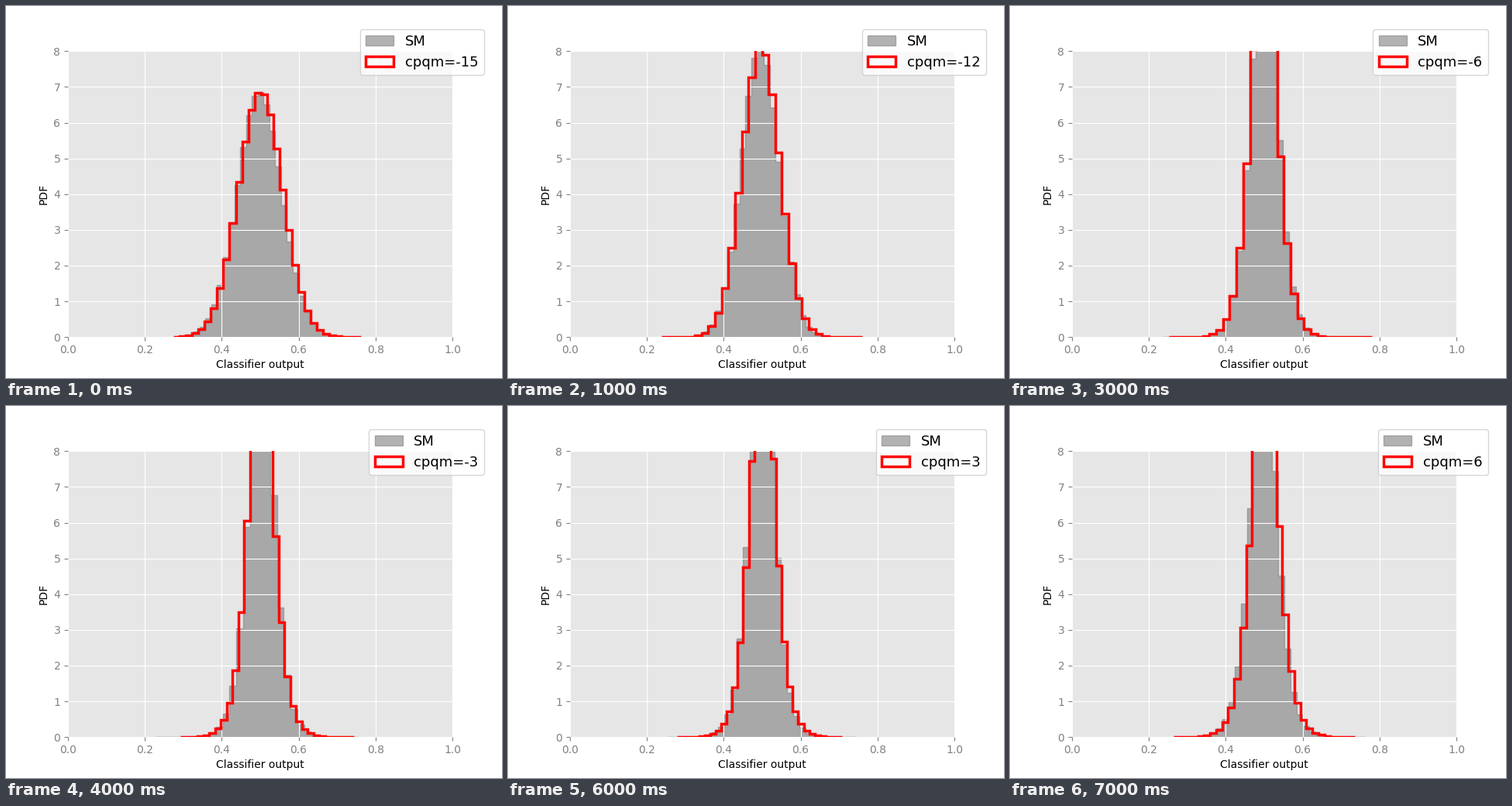
Write a matplotlib script that moves like this. It is 640 px wide and 480 px high and loops after 8 s.

```python
import numpy as np
import matplotlib.pyplot as plt
from matplotlib.animation import FuncAnimation

BINS = 30
FLOOR = 0.005   # height of nearly empty bins

# Key points over the coupling; values in between are interpolated.
KEYS = [-15, -12, -9, -3, 0, 6]
WIDTH = [.0575, .0487, .0363, .03, .0268, .0314]
POWER = [30, 30, 4, 2, 2, 2]   # high: Gaussian core, 2: exponential tails

SM = dict(center=[.4975, .494, .495, .5015, .499, .4985],
          low=[.282, .252, .247, .226, .231, .278],
          high=[.736, .724, .755, .755, .727, .762])
EFT = dict(center=[.5, .496, .4955, .502, .5, .5015],
           low=[.2742, .238, .212, .2923, .2923, .2651],
           high=[.7611, .76, .8145, .744, .6815, .7349])


def at(c, values):
    return np.interp(c, KEYS, values)


def histogram(c, sample):
    """Bin edges and normalised heights of a sech**power bell."""
    edges = np.linspace(at(c, sample['low']), at(c, sample['high']), BINS + 1)
    mid = (edges[1:] + edges[:-1]) / 2
    power = at(c, POWER)
    scale = at(c, WIDTH) * np.sqrt(power)
    bell = np.cosh((mid - at(c, sample['center'])) / scale) ** -power
    density = bell / (bell.sum() * (edges[1] - edges[0]))
    return edges, mid, np.maximum(density, FLOOR)


def draw_hist(c, sample, **style):
    edges, mid, heights = histogram(c, sample)
    ax.hist(mid, edges, weights=heights, **style)


fig, ax = plt.subplots(figsize=(6.4, 4.8), dpi=100)


def draw(i):
    c = -15 + 3 * i
    ax.clear()
    ax.set_facecolor('#E6E6E6')
    ax.grid(color='w', linestyle='solid', linewidth=0.8)
    for spine in ax.spines.values():
        spine.set_visible(False)
    ax.tick_params(colors='gray', direction='out')

    draw_hist(c, SM, histtype='stepfilled', facecolor='gray', edgecolor='gray',
              linewidth=1, alpha=0.6, label='SM')
    draw_hist(c, EFT, histtype='step', edgecolor='red', linewidth=2.5,
              label=f'cpqm={c}' if c else None)

    ax.set(xlim=(0, 1), ylim=(0, 8.016), xlabel='Classifier output', ylabel='PDF')
    ax.legend(loc='upper right', bbox_to_anchor=(1.1, 1.1), fontsize=13)
    return []


anim = FuncAnimation(fig, draw, frames=8, interval=1000, repeat=True, repeat_delay=0)
plt.show()
```
